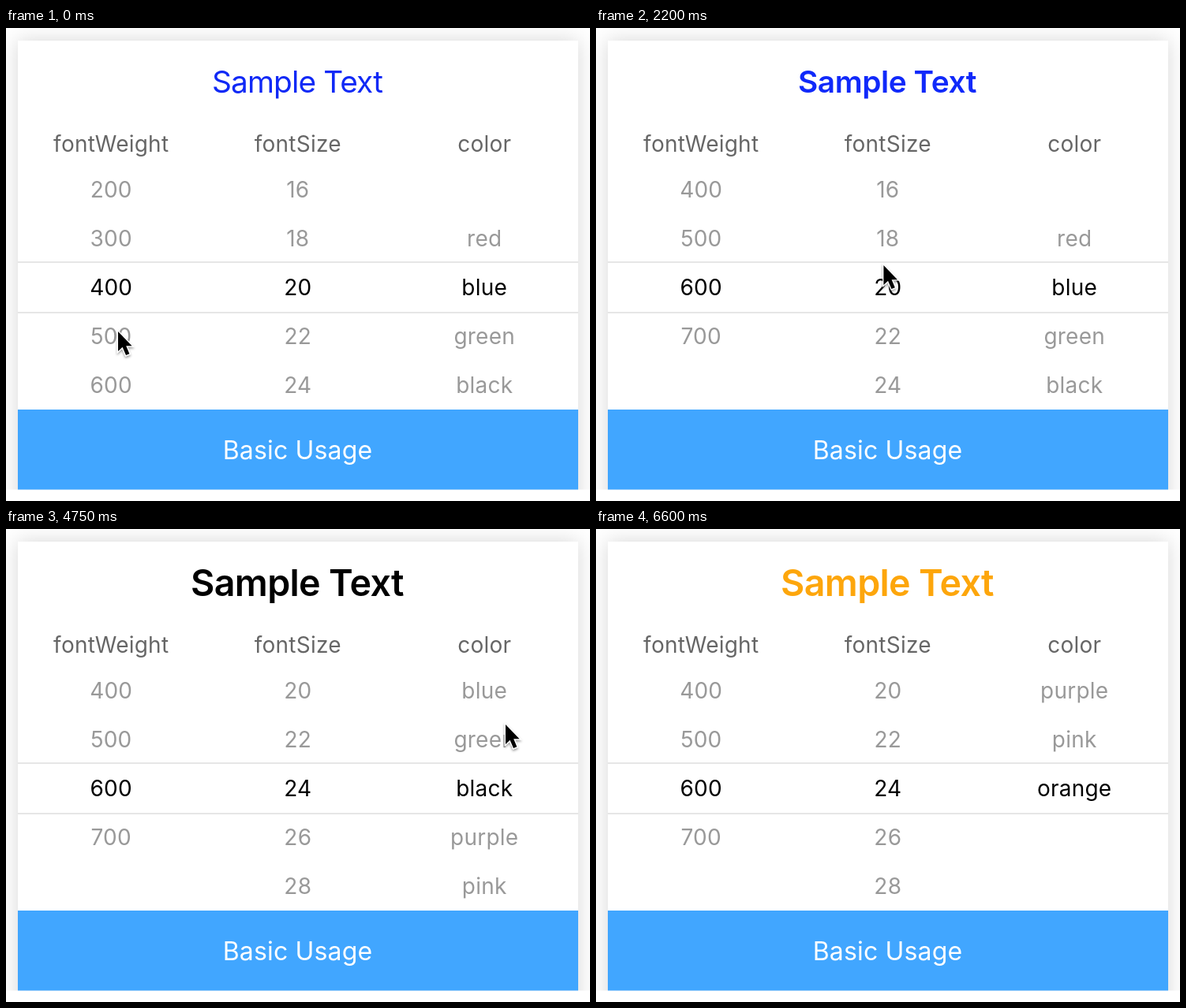
An HTML page that plays this animation: 740x600 px, repeating every 6750 ms.

```html
<!DOCTYPE html>
<html lang="en">
<head>
<meta charset="utf-8">
<title>Text style picker</title>
<style>
  html, body { margin: 0; width: 100%; height: 100%; overflow: hidden; background: #fff; }
  svg { display: block; width: 740px; height: 600px; }
  text {
    font: 400 28px Inter, "Liberation Sans", sans-serif;
    font-optical-sizing: none;
    letter-spacing: .008em;
    text-anchor: middle;
  }
  #labels { fill: #666; }
  #idle { fill: #999; }
  #active { fill: #000; }
  #button { font-size: 32px; letter-spacing: .005em; fill: #fff; }
</style>
</head>
<body>
<svg viewBox="0 0 740 600">
  <defs>
    <filter id="soft" filterUnits="userSpaceOnUse" x="-60" y="-60" width="860" height="800">
      <feGaussianBlur stdDeviation="13"/>
    </filter>
    <filter id="drop" x="-50%" y="-50%" width="200%" height="200%">
      <feDropShadow dx="0" dy="2" stdDeviation="1.5" flood-color="#000" flood-opacity=".4"/>
    </filter>
    <clipPath id="page"><rect width="740" height="585.5"/></clipPath>
    <clipPath id="wheel"><rect x="15" y="174" width="710" height="310"/></clipPath>
    <clipPath id="band"><rect x="15" y="297" width="710" height="64"/></clipPath>
  </defs>
  <g clip-path="url(#page)">
    <rect x="15" y="16" width="710" height="660" fill="#000" fill-opacity=".16" filter="url(#soft)"/>
    <rect x="15" y="16" width="710" height="570" fill="#fff"/>
  </g>
  <text id="title" x="369">Sample Text</text>
  <g id="labels"></g>
  <g id="idle" clip-path="url(#wheel)"></g>
  <rect x="15" y="297" width="710" height="64" fill="#fff"/>
  <g clip-path="url(#band)"><g id="active"></g></g>
  <path d="M15 297H725M15 361H725" stroke="#e6e6e6" stroke-width="2"/>
  <rect x="15" y="484" width="710" height="101.5" fill="#41a6ff"/>
  <text id="button" x="369.5" y="546.5">Basic Usage</text>
  <path id="cursor" d="M0 0V25L5.6 19.8L10 30L14.4 28.2L10.2 18.2H17.6Z"
    stroke="#fff" stroke-width="2.6" paint-order="stroke" filter="url(#drop)"/>
</svg>
<script>
const LOOP = 6750, STEP = 50, ROW = 61.8, BASE = 339;
const $ = id => document.getElementById(id);

const range = (from, to, by) =>
  Array.from({ length: (to - from) / by + 1 }, (_, i) => from + i * by);

// Wheel tracks: [time, scroll in px from the starting row]
const columns = [
  { name: 'fontWeight', x: 133.2, start: 3, items: range(100, 700, 100),
    track: [[650, 0], [1100, 112], [1400, 2 * ROW]] },
  { name: 'fontSize', x: 369.8, start: 4, items: range(12, 30, 2),
    track: [[2350, 0], [2800, 108], [3050, 2 * ROW]] },
  { name: 'color', x: 606.2, start: 1,
    items: ['red', 'blue', 'green', 'black', 'purple', 'pink', 'orange'],
    track: [[3800, 0], [3950, 32], [4150, 98], [4450, 2 * ROW],
            [5250, 2 * ROW], [5700, 5 * ROW + 15.5], [5750, 5 * ROW + 15.5], [6050, 5 * ROW]] }
];

// Pointer track: [time, x, y]
const pointer = [
  [0, 142, 385], [600, 158, 468], [650, 158, 468], [1100, 162, 355], [1450, 162, 355],
  [2100, 367, 319], [2250, 364, 298], [2350, 364, 298], [2800, 374, 181], [3050, 374, 181],
  [3500, 628, 382], [3700, 633, 346], [3800, 633, 346], [3950, 633, 306], [4150, 633, 248],
  [4750, 633, 248], [5200, 608, 418], [5250, 608, 418], [5700, 606, 202], [5800, 606, 202],
  [6100, 566, 300], [6350, 370, 558]
];
const POINTER_END = 6400;

// Title styles: [time, weight, size, baseline, colour, tracking]
const styles = [
  [0, 400, 38.8, 82, '#1029f6', -.023],
  [1150, 600, 38.8, 82, '#1029fa', -.011],
  [2850, 600, 46.6, 85, '#1029fa', -.014],
  [4200, 600, 46.6, 85, '#000', -.014],
  [5800, 600, 46.6, 85, '#fda60c', -.014]
];

const ease = p => p * (1.6 + p * (-.2 - .4 * p));

function sample(track, t) {
  const i = track.findIndex(k => k[0] > t);
  if (i === 0) return track[0].slice(1);
  if (i < 0) return track[track.length - 1].slice(1);
  const a = track[i - 1], b = track[i];
  const p = ease((t - a[0]) / (b[0] - a[0]));
  return a.slice(1).map((v, n) => v + (b[n + 1] - v) * p);
}

function add(parent, tag, attrs, content = '') {
  const el = document.createElementNS('http://www.w3.org/2000/svg', tag);
  for (const key in attrs) el.setAttribute(key, attrs[key]);
  el.textContent = content;
  parent.append(el);
  return el;
}

for (const col of columns) {
  add($('labels'), 'text', { x: col.x, y: 157 }, col.name);
  col.lists = ['idle', 'active'].map(id => {
    const list = add($(id), 'g', {});
    col.items.forEach((item, i) =>
      add(list, 'text', { x: col.x, y: BASE + (i - col.start) * ROW }, item));
    return list;
  });
}

function draw(t) {
  for (const col of columns) {
    const [scroll] = sample(col.track, t);
    for (const list of col.lists) list.setAttribute('transform', `translate(0 ${-scroll})`);
  }

  const [, weight, size, y, fill, spacing] = styles.filter(s => s[0] <= t).pop();
  const title = $('title');
  title.setAttribute('y', y);
  Object.assign(title.style, {
    fontWeight: weight, fontSize: size + 'px', fill, letterSpacing: spacing + 'em'
  });

  const [px, py] = sample(pointer, t);
  $('cursor').setAttribute('transform', `translate(${px} ${py})`);
  $('cursor').style.display = t < POINTER_END ? '' : 'none';
}

const origin = performance.now();
function tick() {
  const t = (performance.now() - origin) % LOOP;
  draw(Math.floor(t / STEP) * STEP);
  requestAnimationFrame(tick);
}
tick();
</script>
</body>
</html>
```
